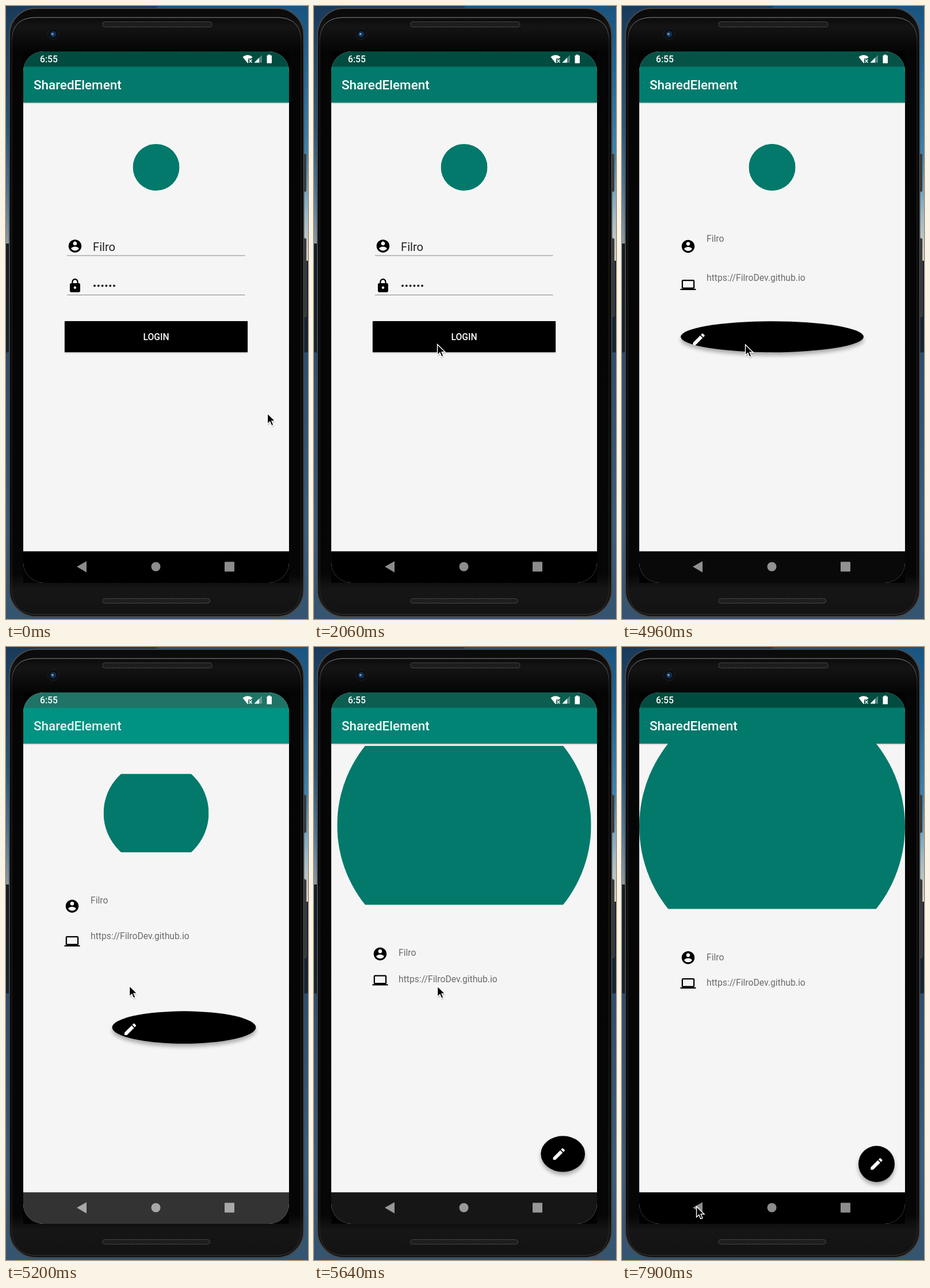
Write an HTML page that moves like this. It is 525 px wide and 1066 px high and loops after 8000 ms.

```html
<!DOCTYPE html>
<html lang="en">
<head>
<meta charset="utf-8">
<title>SharedElement</title>
<style>
html, body { margin: 0; width: 100%; height: 100%; overflow: hidden; background: #14202e; }
svg { display: block; width: 100%; height: 100%; }
text { font-family: Roboto, sans-serif; font-size: 15.72px; }
.medium { font-weight: 500; }
</style>
</head>
<body>
<svg viewBox="0 0 525 1066">
  <defs>
    <linearGradient id="skyLeft" x2="0" y2="1">
      <stop offset="0" stop-color="#1a3a5a"/><stop offset=".2" stop-color="#265880"/>
      <stop offset=".3" stop-color="#4d7694"/><stop offset=".387" stop-color="#8798a3"/>
      <stop offset=".387" stop-color="#111c28"/><stop offset=".564" stop-color="#142231"/>
      <stop offset=".566" stop-color="#2b4c6e"/><stop offset=".85" stop-color="#395d80"/>
      <stop offset="1" stop-color="#34546f"/>
    </linearGradient>
    <linearGradient id="skyRight" x2="0" y2="1">
      <stop offset="0" stop-color="#1b5480"/><stop offset=".1" stop-color="#1f6597"/>
      <stop offset=".25" stop-color="#4086b0"/><stop offset=".34" stop-color="#9db9c4"/>
      <stop offset=".415" stop-color="#dacfc5"/><stop offset=".416" stop-color="#14202d"/>
      <stop offset=".564" stop-color="#172534"/><stop offset=".566" stop-color="#2c4d6f"/>
      <stop offset=".85" stop-color="#395d82"/><stop offset="1" stop-color="#34546f"/>
    </linearGradient>
    <linearGradient id="body" x2="0" y2="1">
      <stop offset="0" stop-color="#0a0a0a"/><stop offset=".016" stop-color="#0c0c0c"/>
      <stop offset=".03" stop-color="#141414"/><stop offset=".07" stop-color="#050505"/>
      <stop offset=".93" stop-color="#060606"/><stop offset=".955" stop-color="#161616"/>
      <stop offset="1" stop-color="#121212"/>
    </linearGradient>
    <linearGradient id="rim" x2="0" y2="1">
      <stop offset="0" stop-color="#8a8a8a"/><stop offset=".04" stop-color="#2c2c2c"/>
      <stop offset=".96" stop-color="#262626"/><stop offset="1" stop-color="#3a3a3a"/>
    </linearGradient>
    <pattern id="mesh" width="4" height="4" patternUnits="userSpaceOnUse">
      <path d="M0 4L4 0" stroke="#3c3c3c"/>
    </pattern>
    <filter id="soft" x="-20%" y="-50%" width="140%" height="200%"><feGaussianBlur stdDeviation="3.5"/></filter>
    <filter id="tight" x="-10%" y="-30%" width="120%" height="160%"><feGaussianBlur stdDeviation="1.2"/></filter>
    <clipPath id="screen"><rect x="30" y="79" width="462" height="924" rx="35"/></clipPath>
    <clipPath id="crop"><rect id="cropBox"/></clipPath>
    <path id="account" d="M12 2C6.48 2 2 6.48 2 12s4.48 10 10 10 10-4.48 10-10S17.52 2 12 2zm0 3c1.66 0 3 1.34 3 3s-1.34 3-3 3-3-1.34-3-3 1.34-3 3-3zm0 14.2c-2.5 0-4.71-1.28-6-3.22.03-1.99 4-3.08 6-3.08 1.99 0 5.97 1.09 6 3.08-1.29 1.94-3.5 3.22-6 3.22z"/>
    <path id="lock" d="M18 8h-1V6c0-2.76-2.24-5-5-5S7 3.24 7 6v2H6c-1.1 0-2 .9-2 2v10c0 1.1.9 2 2 2h12c1.1 0 2-.9 2-2V10c0-1.1-.9-2-2-2zm-6 9c-1.1 0-2-.9-2-2s.9-2 2-2 2 .9 2 2-.9 2-2 2zm3.1-9H8.9V6c0-1.71 1.39-3.1 3.1-3.1s3.1 1.39 3.1 3.1v2z"/>
    <path id="laptop" d="M20 18c1.1 0 2-.9 2-2V6c0-1.1-.9-2-2-2H4c-1.1 0-2 .9-2 2v10c0 1.1.9 2 2 2H0v2h24v-2h-4zM4 6h16v10H4V6z"/>
    <path id="pencil" d="M3 17.25V21h3.75L17.81 9.94l-3.75-3.75L3 17.25zM20.71 7.04c.39-.39.39-1.02 0-1.41l-2.34-2.34c-.39-.39-1.02-.39-1.41 0l-1.83 1.83 3.75 3.75 1.83-1.83z"/>
    <path id="arrow" d="M0 0V18.500L4.300 14.500L7.200 21.300L10.500 20L7.600 13.200H13.500Z"/>
  </defs>

  <!-- wallpaper and phone -->
  <rect width="262" height="1066" fill="url(#skyLeft)"/>
  <rect x="262" width="263" height="1066" fill="url(#skyRight)"/>
  <g fill="#333" stroke="#666" stroke-width=".8">
    <rect x="514" y="257" width="8" height="66" rx="2"/>
    <rect x="514" y="404" width="8" height="136" rx="2"/>
  </g>
  <rect x="6" y="4" width="511.500" height="1058" rx="46" fill="url(#body)" stroke="#484848" stroke-width="2"/>
  <path d="M10 62C10 34 24 20 52 20H471C499 20 513 34 513 62V1010C513 1042 498 1058 468 1058H54C24 1058 10 1042 10 1010Z" fill="none" stroke="url(#rim)"/>
  <g fill="url(#mesh)" stroke="#444">
    <rect x="168" y="27.500" width="190" height="9" rx="4"/>
    <rect x="167.500" y="1030.500" width="187" height="8" rx="4"/>
  </g>
  <circle cx="82" cy="49" r="9.500" fill="#0b0d10" stroke="#202327"/>
  <circle cx="82" cy="49" r="5.500" fill="#142c47"/>
  <circle cx="81" cy="49" r="2.300" fill="#3e76a8"/>
  <circle cx="80.500" cy="48" r="1" fill="#a9cfe8"/>
  <rect x="30" y="79" width="462" height="924" fill="#020202"/>

  <g clip-path="url(#screen)">
    <rect x="30" y="79" width="462" height="924" fill="#f5f5f5"/>
    <rect x="30" y="164" width="462" height="5" fill="#000" opacity=".3" filter="url(#tight)"/>
    <rect id="toolbar" x="30" y="105" width="462" height="63"/>
    <rect id="status" x="30" y="79" width="462" height="26.500"/>
    <rect id="nav" x="30" y="948.300" width="462" height="55"/>
    <g fill="#fff">
      <text class="medium" x="59" y="98">6:55</text>
      <text id="title" class="medium" x="48" y="145.300" style="font-size:22.460px">SharedElement</text>
      <path d="M411.500 88.500Q420 82 428.500 88.500L426 91.500H421V98.500L420 99.500Z"/>
      <path d="M422.500 93l5 5.500m0-5.500l-5 5.500" stroke="#fff" stroke-width="1.500"/>
      <path d="M445 85V98.500H431.500Z" opacity=".3"/>
      <path d="M440 90V98.500H431.500Z"/>
      <path d="M455.500 84.500h4v1.500h2.500v13.500h-8.500V86h2z"/>
    </g>
    <g id="navIcons">
      <path d="M123 975L140 965.500V985Z"/>
      <circle cx="260.500" cy="975" r="8"/>
      <rect x="380" y="966.500" width="17" height="17" rx="1"/>
    </g>

    <circle id="avatar" cx="261" fill="#02796b" clip-path="url(#crop)"/>

    <g id="login">
      <path d="M106 434H415.500M106 502.500H415.500" stroke="#858585" stroke-width="1.200"/>
      <use href="#account" transform="translate(106.500 404)scale(1.123)"/>
      <use href="#lock" transform="translate(106.500 473)scale(1.123)"/>
      <text x="151" y="425.500" fill="#212121" style="font-size:20.210px">Filro</text>
      <path d="M154 486.500H189" stroke="#212121" stroke-width="4" stroke-linecap="round" stroke-dasharray="0 6.800"/>
      <rect id="buttonShade" x="102" width="318" height="54"/>
      <rect x="102" y="548" width="318" height="54"/>
      <text id="buttonText" class="medium" x="261" y="581" fill="#fff" text-anchor="middle">LOGIN</text>
    </g>

    <g id="profile" fill="#6b6b6b">
      <use id="nameIcon" href="#account" fill="#000"/>
      <use id="linkIcon" href="#laptop" fill="#000"/>
      <text id="name" x="147">Filro</text>
      <text id="link" x="147">https://FilroDev.github.io</text>
      <ellipse id="fabShade" fill="#000" opacity=".32" filter="url(#soft)"/>
      <ellipse id="fab" fill="#000"/>
      <use id="fabIcon" href="#pencil" fill="#fff"/>
    </g>
  </g>

  <g id="cursor">
    <use href="#arrow" transform="translate(.5 2)" opacity=".3" filter="url(#tight)"/>
    <use href="#arrow" stroke="#fff" stroke-width="1.400"/>
  </g>
</svg>

<script>
const LOOP = 8000;
const MORPH = 4947, MORPH_TIME = 968;
const el = {};
document.querySelectorAll('svg [id]').forEach(node => el[node.id] = node);

const clamp = v => Math.min(1, Math.max(0, v));
const mix = (a, b, k) => a + (b - a) * k;
const ramp = (t, from, to) => clamp((t - from) / (to - from));
const smooth = k => k * k * (3 - 2 * k);
const mixColor = (a, b, k) => `rgb(${a.map((v, i) => Math.round(mix(v, b[i], k)))})`;

function set(id, attrs) {
  for (const key in attrs) el[id].setAttribute(key, attrs[key]);
}

// cubic-bezier(.4, 0, .2, 1)
function fastOutSlowIn(x) {
  let lo = 0, hi = 1;
  for (let i = 0; i < 24; i++) {
    const s = (lo + hi) / 2, r = 1 - s;
    if (1.2 * r * r * s + .6 * r * s * s + s * s * s < x) lo = s; else hi = s;
  }
  return smooth(lo);
}

function track(t, points) {
  for (let i = 1; i < points.length; i++) {
    const [t0, v0] = points[i - 1], [t1, v1] = points[i];
    if (t < t1) return mix(v0, v1, ramp(t, t0, t1));
  }
  return points[points.length - 1][1];
}

function drawBars(t) {
  const glow = track(t, [[MORPH - 20, 0], [5080, .75], [5200, 1], [5380, .85], [5900, 0]]);
  set('toolbar', { fill: mixColor([1, 121, 107], [0, 146, 131], glow) });
  set('status', { fill: mixColor([0, 76, 64], [31, 115, 103], glow) });
  set('nav', { fill: mixColor([0, 0, 0], [51, 51, 51], glow) });
  set('navIcons', { fill: mixColor([140, 140, 140], [168, 168, 168], glow) });
  set('title', { fill: mixColor([255, 255, 255], [230, 244, 242], glow) });
}

function drawLogin(t) {
  const press = ramp(t, 4260, 4360);
  set('login', { visibility: t < MORPH ? 'visible' : 'hidden' });
  set('buttonShade', {
    y: mix(549, 553, press),
    opacity: mix(.35, .3, press),
    filter: press > .5 ? 'url(#soft)' : 'url(#tight)'
  });
  set('buttonText', { opacity: mix(1, .85, press) });
}

function drawShared(t) {
  const k = fastOutSlowIn(ramp(t, MORPH, MORPH + MORPH_TIME));
  const left = mix(220.5, 30, k), right = mix(301.5, 492, k);
  const top = mix(240, 168, k), bottom = mix(321, 455.5, k);
  set('cropBox', { x: left, y: top, width: right - left, height: bottom - top });
  set('avatar', { cy: (top + bottom) / 2, r: (right - left) / 2 });

  set('profile', { visibility: t < MORPH ? 'hidden' : 'visible' });
  const icon = (id, x, y) => set(id, { transform: `translate(${x - 13.5} ${y - 13.5})scale(1.123)` });
  icon('nameIcon', 115, mix(418, 540.3, k));
  icon('linkIcon', 115, mix(485, 585, k));
  set('name', { y: mix(409.5, 544.5, k) });
  set('link', { y: mix(478, 589, k) });

  const x = mix(102, 411, k), y = mix(548, 867.5, k);
  const rx = (mix(420, 474, k) - x) / 2, ry = (mix(602, 930.5, k) - y) / 2;
  set('fab', { cx: x + rx, cy: y + ry, rx, ry });
  set('fabShade', { cx: x + rx, cy: y + ry + 5, rx, ry });
  icon('fabIcon', x + 31.5, y + 31.5);
}

function drawCursor(t) {
  const toButton = smooth(ramp(t, 20, 860));
  const drift = ramp(t, 4500, 6400);
  const toBack = smooth(ramp(t, 6950, 7680));
  const x = mix(mix(454.5, 214.5, toButton), 129.5, toBack);
  const y = mix(mix(708.5, 588.5, toButton) + 2 * drift, 973, toBack);
  set('cursor', { transform: `translate(${x} ${y})` });
}

function draw(t) {
  drawBars(t);
  drawLogin(t);
  drawShared(t);
  drawCursor(t);
}

const start = performance.now();
function tick() {
  draw((performance.now() - start) % LOOP);
  requestAnimationFrame(tick);
}
draw(0);
requestAnimationFrame(tick);
</script>
</body>
</html>
```
